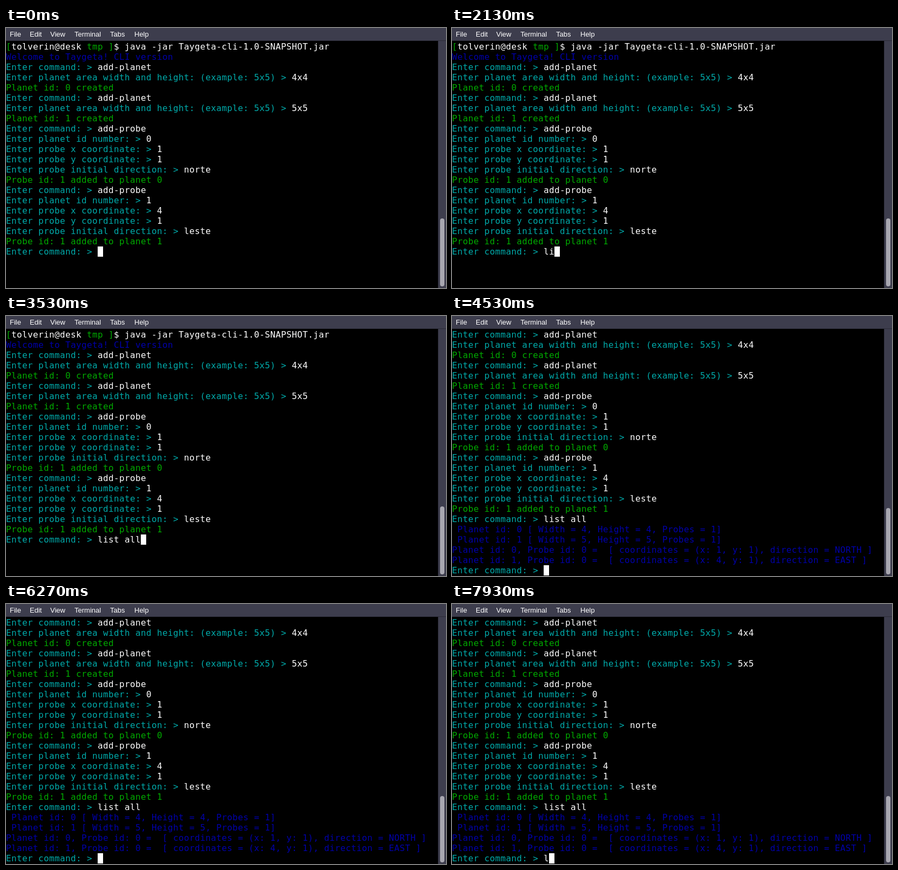
Write an HTML page with a canvas that moves like this. It is 816x482 px and loops after 8000 ms.

```html
<!DOCTYPE html>
<html lang="en">
<head>
<meta charset="utf-8">
<title>Terminal</title>
<style>
  html, body { margin: 0; width: 100%; height: 100%; overflow: hidden; background: #000; }
  canvas { display: block; }
</style>
</head>
<body>
<canvas id="stage" width="816" height="482"></canvas>
<script>
const ctx = document.getElementById('stage').getContext('2d');
const LOOP = 8000, CELL = 10, ROW = 19, TOP = 25, ASCENT = 15;
const WHITE = '#fff', GREEN = '#00aa00', CYAN = '#00aaaa', BLUE = '#0000aa';
const BAR = '#3d3d4d', EDGE = '#2b2b38', THUMB = '#a8a7b0';

const MENU = [['File', 7], ['Edit', 44], ['View', 82], ['Terminal', 127], ['Tabs', 193], ['Help', 238]];

// A line is a list of [text, colour] runs.
const ask = (label, answer) => [[label + ' > ', CYAN], [answer, WHITE]];
const command = text => ask('Enter command:', text);
const say = (text, color) => [[text, color]];

const addPlanet = (id, size) => [
  command('add-planet'),
  ask('Enter planet area width and height: (example: 5x5)', size),
  say(`Planet id: ${id} created`, GREEN)
];
const addProbe = (planet, x, y, dir) => [
  command('add-probe'),
  ask('Enter planet id number:', planet),
  ask('Enter probe x coordinate:', x),
  ask('Enter probe y coordinate:', y),
  ask('Enter probe initial direction:', dir),
  say(`Probe id: 1 added to planet ${planet}`, GREEN)
];
const planetInfo = (id, n) => say(` Planet id: ${id} [ Width = ${n}, Height = ${n}, Probes = 1]`, BLUE);
const probeInfo = (id, x, dir) =>
  say(`Planet id: ${id}, Probe id: 0 =  [ coordinates = (x: ${x}, y: 1), direction = ${dir} ]`, BLUE);

const history = [
  [['[', GREEN], ['tolverin@desk', WHITE], [' tmp ]', GREEN], ['$ java -jar Taygeta-cli-1.0-SNAPSHOT.jar', WHITE]],
  say('Welcome to Taygeta! CLI version', BLUE),
  ...addPlanet('0', '4x4'),
  ...addPlanet('1', '5x5'),
  ...addProbe('0', '1', '1', 'norte'),
  ...addProbe('1', '4', '1', 'leste')
];
const listing = [
  command('list all'),
  planetInfo(0, 4), planetInfo(1, 5),
  probeInfo(0, 1, 'NORTH'), probeInfo(1, 4, 'EAST')
];

// Key press times in ms.
const KEYS = [1930, 2070, 2270, 2470, 2670, 2930, 3070, 3270];
const ENTER = 3930, NEXT_KEY = 7730;

function typed(t) {
  if (t >= ENTER) return t >= NEXT_KEY ? 'l' : '';
  return 'list all'.slice(0, KEYS.filter(k => t >= k).length);
}

function rect(color, x, y, w, h) {
  ctx.fillStyle = color;
  ctx.fillRect(x, y, w, h);
}

function drawLine(runs, row) {
  let x = 0;
  for (const [text, color] of runs) {
    ctx.fillStyle = color;
    for (const ch of text) {
      if (ch !== ' ') ctx.fillText(ch, x, TOP + row * ROW + ASCENT);
      x += CELL;
    }
  }
  return x;
}

function drawFrame(thumbTop) {
  rect(BAR, 0, 0, 816, 23);
  rect(EDGE, 0, 23, 816, 1);
  rect(BAR, 802, 24, 14, 458);
  rect(EDGE, 801, 24, 1, 458);
  ctx.fillStyle = THUMB;
  ctx.beginPath();
  ctx.roundRect(805, thumbTop, 8, 479 - thumbTop, 4);
  ctx.fill();
  ctx.font = '13px "Liberation Sans", Arial, sans-serif';
  ctx.fillStyle = WHITE;
  for (const [label, x] of MENU) ctx.fillText(label, x, 16);
}

function draw(t) {
  const listed = t >= ENTER;
  const lines = listed ? [...history.slice(2), ...listing] : [...history];
  lines.push(command(typed(t)));

  rect('#000', 0, 0, 816, 482);
  ctx.font = '16px "DejaVu Sans Mono", monospace';
  let end = 0;
  lines.forEach((line, row) => { end = drawLine(line, row); });
  rect(WHITE, end, TOP + (lines.length - 1) * ROW, CELL, ROW);
  drawFrame(listed ? 356 : 353);
}

const start = performance.now();
function tick() {
  draw((performance.now() - start) % LOOP);
  requestAnimationFrame(tick);
}
tick();
</script>
</body>
</html>
```
